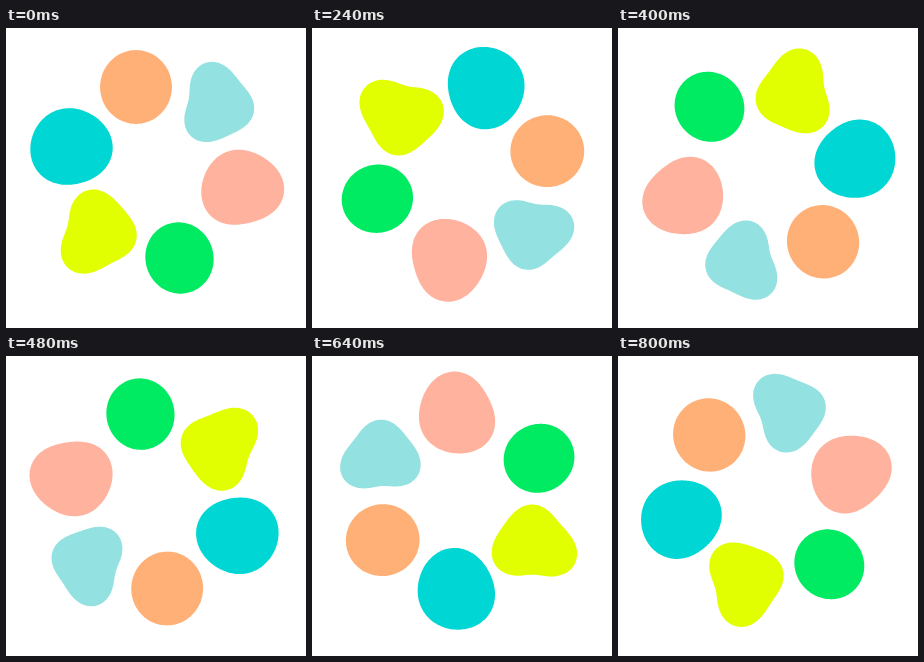
Animation of 300x300 px, one loop 0.88 s. Source, as an HTML page with a canvas:

```html
<!DOCTYPE html>
<html lang="en">
<head>
<meta charset="utf-8">
<title>Spinning blobs</title>
<style>
  html, body { margin: 0; width: 100%; height: 100%; overflow: hidden; background: #fff; }
  canvas { display: block; }
</style>
</head>
<body>
<canvas id="stage" width="300" height="300"></canvas>
<script>
const ctx = document.getElementById('stage').getContext('2d');
const CENTER = { x: 149.8, y: 145 };
const STEP_MS = 80;
const STEPS = 11;
const TIP_ANGLE = 12;
const rad = degrees => degrees * Math.PI / 180;

// size: mean radius; stretch: oval part along the lean angle; corners: three-cornered part.
const blobs = [
  { color: '#ffb077', x: 130, y: 59, size: 36.4, stretch: 0.5, lean: 90, corners: 0 },
  { color: '#94e1e1', x: 211, y: 76, size: 36, stretch: 2.9, lean: 94, corners: 4.5 },
  { color: '#ffb39e', x: 235.5, y: 160, size: 39.3, stretch: 2.1, lean: -7, corners: 1.6 },
  { color: '#00eb62', x: 173.5, y: 230, size: 34.9, stretch: 0.9, lean: 73, corners: 0 },
  { color: '#e1ff00', x: 91, y: 205, size: 38.1, stretch: 3.2, lean: 112, corners: 4.7 },
  { color: '#00d7d4', x: 64.8, y: 119, size: 39.7, stretch: 1.5, lean: -6, corners: 0.9 }
];

function blobPath({ x, y, size, stretch, lean, corners }) {
  const path = new Path2D();
  for (let a = 0; a < 360; a += 3) {
    const radius = size
      + stretch * Math.cos(rad(2 * (a - lean)))
      + corners * Math.cos(rad(3 * (a - TIP_ANGLE)));
    path.lineTo(x + radius * Math.cos(rad(a)), y + radius * Math.sin(rad(a)));
  }
  path.closePath();
  return path;
}

for (const blob of blobs) blob.path = blobPath(blob);

// The spin gains speed over the loop, with a small extra jump every third step.
const turn = step => 26.3 * step + 0.46 * step ** 2 + 5.6 * Math.ceil(step / 3);

function draw(time) {
  const step = Math.floor(Math.max(time, 0) / STEP_MS) % STEPS;
  ctx.fillStyle = '#fff';
  ctx.fillRect(0, 0, 300, 300);
  ctx.save();
  ctx.translate(CENTER.x, CENTER.y);
  ctx.rotate(rad(turn(step)));
  ctx.translate(-CENTER.x, -CENTER.y);
  for (const { color, path } of blobs) {
    ctx.fillStyle = color;
    ctx.fill(path);
  }
  ctx.restore();
}

const start = performance.now();
function tick(now) {
  draw(now - start);
  requestAnimationFrame(tick);
}
draw(0);
requestAnimationFrame(tick);
</script>
</body>
</html>
```
